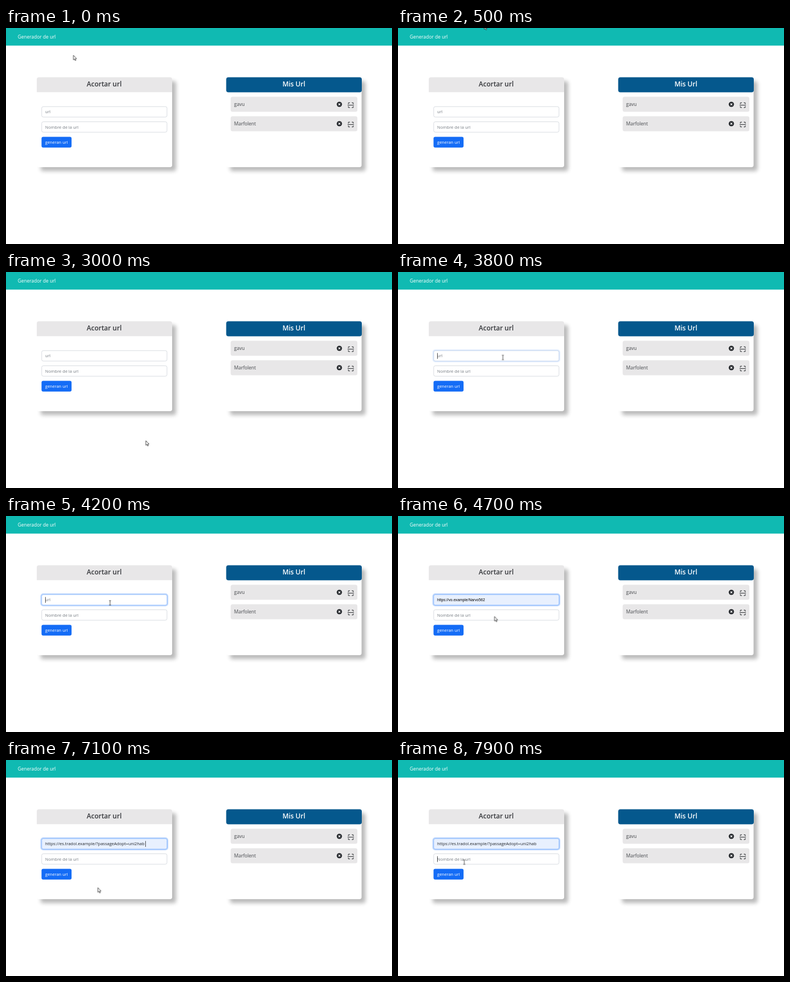
An HTML page that plays this animation: 690x388 px, repeating every 8000 ms.

```html
<!DOCTYPE html>
<html lang="es">
<head>
<meta charset="utf-8">
<title>Generador de url</title>
<style>
  html, body { margin: 0; width: 100%; height: 100%; overflow: hidden; background: #fff; }
  svg { display: block; width: 100%; height: 100%; }

  text { font-family: "Open Sans", "Noto Sans", sans-serif; font-size: 7.55px; fill: #212529; white-space: pre; }
  .brand { font-size: 8.5px; fill: #fff; }
  .title { font-size: 12px; font-weight: 600; fill: #34363a; text-anchor: middle; }
  .light { fill: #fff; }
  .hint { fill: #747a81; }
  .item text { font-size: 8.5px; fill: #44474b; }
  .preview text { font: 6.73px "Liberation Sans", Arial, sans-serif; fill: #000; }

  .field { fill: #fff; stroke: #cfd4da; stroke-width: .8; }
  .filled { fill: #e8f0fe; stroke: #86b7fe; stroke-width: .8; }
  .caret { stroke: #222; stroke-width: .8; }

  /* One loop is 8 s, so 1.25% is 100 ms. */
  .timed { animation: 8s step-end infinite; }
  #pointer { animation-name: move; }
  #arrow { animation-name: arrow; }
  #beam { animation-name: beam; }
  #ring { animation-name: ring; }
  #hint { animation-name: hint; }
  #fill { animation-name: fill; }
  #first { animation-name: first; }
  #second { animation-name: second; }
  #chosen { animation-name: chosen; }
  #caretUrl { animation-name: caretUrl; }
  #caretEnd { animation-name: caretEnd; }
  #caretName { animation-name: caretName; }

  @keyframes move {
    0% { transform: translate(120.5px, 49px); }
    3.75% { transform: translate(138px, 30px); }
    5% { transform: translate(155.5px, 8px); }
    6.25% { transform: translate(154px, -6px); }
    27.5% { transform: translate(292.5px, 177.3px); }
    31.25% { transform: translate(289px, 196px); }
    32.5% { transform: translate(281px, 224px); }
    33.75% { transform: translate(277.5px, 241px); }
    36.25% { transform: translate(270px, 268px); }
    37.5% { transform: translate(250px, 303px); }
    38.75% { transform: translate(230px, 268px); }
    40% { transform: translate(210px, 212px); }
    41.25% { transform: translate(196px, 165.5px); }
    45% { transform: translate(188.5px, 156px); }
    46.25% { transform: translate(187.5px, 153.5px); }
    52.5% { transform: translate(186px, 156px); }
    53.75% { transform: translate(183px, 163px); }
    55% { transform: translate(179px, 170px); }
    56.25% { transform: translate(175.5px, 175px); }
    57.5% { transform: translate(173.5px, 178.5px); }
    58.75% { transform: translate(172.5px, 180.5px); }
    60% { transform: translate(172px, 183.5px); }
    61.25% { transform: translate(171px, 185.5px); }
    65% { transform: translate(170px, 191px); }
    66.25% { transform: translate(168px, 201px); }
    67.5% { transform: translate(166.5px, 211px); }
    68.75% { transform: translate(165.5px, 219px); }
    70% { transform: translate(165px, 223.3px); }
    71.25% { transform: translate(164.7px, 226px); }
    72.5% { transform: translate(164.4px, 228px); }
    75% { transform: translate(164.2px, 229.3px); }
    91.25% { transform: translate(161px, 226px); }
    92.5% { transform: translate(152px, 217px); }
    93.75% { transform: translate(140px, 206px); }
    95% { transform: translate(128px, 195px); }
    96.25% { transform: translate(121px, 186px); }
    97.5%, 100% { transform: translate(118.5px, 183.5px); }
  }
  @keyframes arrow {
    0%, 53.75% { visibility: visible; }
    45%, 96.25%, 100% { visibility: hidden; }
  }
  @keyframes beam {
    0%, 53.75% { visibility: hidden; }
    45%, 96.25%, 100% { visibility: visible; }
  }
  @keyframes ring {
    0% { opacity: 0; }
    47.5% { opacity: .4; }
    48.75%, 100% { opacity: 1; }
  }
  @keyframes hint {
    0% { visibility: visible; }
    53.75%, 100% { visibility: hidden; }
  }
  @keyframes fill {
    0% { visibility: hidden; }
    53.75%, 100% { visibility: visible; }
  }
  @keyframes first {
    0%, 67.5%, 100% { visibility: hidden; }
    53.75% { visibility: visible; }
  }
  @keyframes second {
    0%, 87.5%, 100% { visibility: hidden; }
    67.5% { visibility: visible; }
  }
  @keyframes chosen {
    0% { visibility: hidden; }
    87.5%, 100% { visibility: visible; }
  }
  @keyframes caretUrl {
    0%, 53.75%, 100% { visibility: hidden; }
    46.25% { visibility: visible; }
  }
  @keyframes caretEnd {
    0%, 95%, 100% { visibility: hidden; }
    88.75% { visibility: visible; }
  }
  @keyframes caretName {
    0% { visibility: hidden; }
    98.75%, 100% { visibility: visible; }
  }
</style>
</head>
<body>
<svg viewBox="0 0 690 388">
  <defs>
    <filter id="soft" x="-10%" y="-15%" width="120%" height="130%">
      <feGaussianBlur stdDeviation="3.6"/>
    </filter>
    <g id="card">
      <rect x="7" y="7" width="242" height="161.5" rx="4" fill="#000" opacity=".27" filter="url(#soft)"/>
      <rect width="242" height="161.5" rx="4" fill="#fff"/>
    </g>
    <g id="row">
      <rect width="226.5" height="27" rx="3.5" fill="#e8e7e8"/>
      <circle cx="194.3" cy="13.5" r="4.7" fill="#24272b"/>
      <path d="M192.6 11.8l3.4 3.4m0-3.4l-3.4 3.4" stroke="#fff" stroke-width="1.1"/>
      <path d="M210.4 13.2v-2.5h2.8m3.2 0h2.8v2.5M210.4 16.8v2.5h2.8m3.2 0h2.8v-2.5M209 15h11.2"
            fill="none" stroke="#24272b"/>
    </g>
  </defs>

  <rect width="690" height="31.6" fill="#10bab2"/>
  <text class="brand" x="21" y="19">Generador de url</text>

  <use href="#card" x="55" y="88.5"/>
  <path d="M55 115.3V92.5a4 4 0 0 1 4-4H293a4 4 0 0 1 4 4V115.3z" fill="#e8e7e8"/>
  <text class="title" x="175.5" y="105">Acortar url</text>

  <rect class="field" x="63.8" y="141.2" width="224" height="18.8" rx="3"/>
  <rect class="field" x="63.8" y="168.4" width="224" height="18.8" rx="3"/>
  <g id="ring" class="timed">
    <rect x="62.6" y="140" width="226.4" height="21.2" rx="4" fill="none" stroke="#bfd7fc" stroke-width="2.2"/>
    <rect x="63.8" y="141.2" width="224" height="18.8" rx="3" fill="#fff" stroke="#86b7fe" stroke-width=".8"/>
  </g>
  <rect id="fill" class="timed filled" x="63.8" y="141.2" width="224" height="18.8" rx="3"/>

  <text id="hint" class="timed hint" x="70" y="153.4">url</text>
  <g class="preview">
    <text id="first" class="timed" x="70" y="153.4">https://vo.example/Narvo562</text>
    <text id="second" class="timed" x="70" y="153.4">https://es.tradol.example/?passageAdopt=uni2hab</text>
  </g>
  <text id="chosen" class="timed" x="70" y="153.4">https://es.tradol.example/?passageAdopt=uni2hab</text>
  <text class="hint" x="70" y="180.6">Nombre de la url</text>

  <path id="caretUrl" class="timed caret" d="M70.5 145.5v10.5"/>
  <path id="caretEnd" class="timed caret" d="M249.5 145.5v10.5"/>
  <path id="caretName" class="timed caret" d="M70.5 172.8v10.5"/>

  <rect x="63.5" y="195.5" width="53.7" height="19.3" rx="3" fill="#146cf6"/>
  <text class="light" x="70" y="208">generan url</text>

  <use href="#card" x="393.6" y="88.5"/>
  <rect x="393.6" y="88.5" width="242.4" height="27" rx="4" fill="#05588d"/>
  <text class="title light" x="514.6" y="105">Mis Url</text>
  <g class="item">
    <use href="#row" x="401.6" y="123.6"/>
    <text x="407.8" y="140.3">gavu</text>
    <use href="#row" x="401.6" y="158.4"/>
    <text x="407.8" y="175.2">Marfolent</text>
  </g>

  <g id="pointer" class="timed">
    <path id="arrow" class="timed" d="M0 0V8.3L1.9 6.6L3.2 9.6L4.5 9L3.2 6.1H5.7Z"
          fill="#fff" stroke="#222" stroke-width=".8" stroke-linejoin="round"/>
    <path id="beam" class="timed" d="M-1.8-4H-.5L0-3.6L.5-4H1.8M0-3.6V3.6M-1.8 4H-.5L0 3.6L.5 4H1.8"
          fill="none" stroke="#222" stroke-width=".8"/>
  </g>
</svg>
</body>
</html>
```
